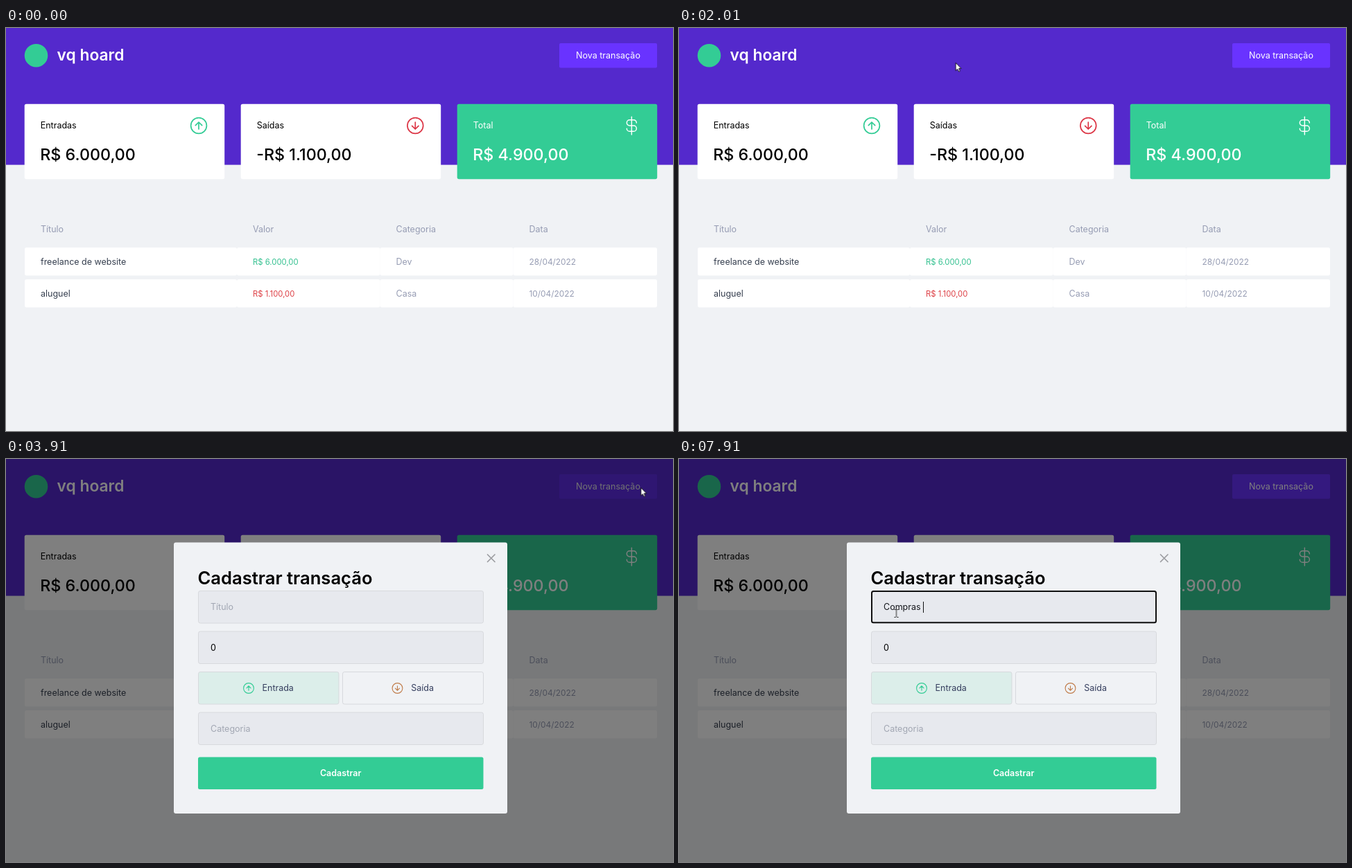
An HTML page that plays this animation: 962x582 px, repeating every 8 s.

```html
<!DOCTYPE html>
<html lang="pt-BR">
<head>
<meta charset="utf-8">
<title>Transações</title>
<style>
  html, body { margin: 0; width: 100%; height: 100%; overflow: hidden; background: #f0f2f5; }
  svg { display: block; width: 100vw; height: 100vh; }
  text { font: 400 12.5px Inter, "Open Sans", sans-serif; }
  .middle { text-anchor: middle; }
  .brand { font-size: 22.8px; font-weight: 600; fill: #fff; }
  .amount { font-size: 23.3px; font-weight: 500; }
  .heading { font-size: 25.6px; font-weight: 600; }
  .strong { font-weight: 600; fill: #fff; }
  .white { fill: #fff; }
  .muted { fill: #969cb3; }
  .hint { fill: #a2a7b3; }
  .name { fill: #363f4f; }
  .gain, .loss { font-size: 11.3px; }
  .gain { fill: #33c08f; }
  .loss { fill: #dd4046; }
  .date { font-size: 11.9px; fill: #969cb3; }
  .choice { fill: #363f5f; }
  .field { fill: #e7e9ee; stroke: #d7d9dd; }
  .field.plain { fill: #f0f2f5; }
  .field.chosen { fill: #dceeea; }
  .line { fill: none; stroke-width: 1.7; stroke-linecap: round; stroke-linejoin: round; }
  .green { stroke: #33cc95; }
  .red { stroke: #dc3545; }
  .amber { stroke: #c07c4a; }
  #modal, #focus, #caret, #beam, .key { visibility: hidden; }
</style>
</head>
<body>
<svg viewBox="0 0 962 582">
  <defs>
    <g id="arrow-icon">
      <circle r="11.4"/>
      <path d="M0 5V-5M-4.7 -.3L0 -5L4.7 -.3"/>
    </g>
  </defs>

  <rect width="962" height="582" fill="#f0f2f5"/>
  <rect width="962" height="197.6" fill="#5429cc"/>
  <circle cx="43.5" cy="39.7" r="16.8" fill="#33cc95"/>
  <text class="brand" x="73.5" y="47">vq hoard</text>

  <rect x="798" y="22" width="141" height="35.5" rx="2" fill="#6933ff"/>
  <text class="white middle" x="868.5" y="44">Nova transação</text>
  <rect id="hover" x="798" y="22" width="141" height="35.5" rx="2" opacity="0"/>

  <g id="cards"></g>
  <use href="#arrow-icon" class="line green" transform="translate(278 141)"/>
  <use href="#arrow-icon" class="line red" transform="translate(590.3 141) scale(1 -1)"/>
  <path class="line" stroke="#fff" style="stroke-width:1.25" transform="translate(888.3 127) scale(1.17)"
    d="M12 1V23M18 8.5A3.5 3.5 0 0 0 14.5 5H9.5a3.5 3.5 0 0 0 0 7h5a3.5 3.5 0 0 1 0 7H9.5A3.5 3.5 0 0 1 6 15.5"/>
  <g id="table"></g>

  <g id="modal">
    <rect width="962" height="582" opacity=".5"/>
    <rect x="242" y="120.5" width="481" height="391.5" rx="3" fill="#f0f2f5"/>
    <path class="line" stroke="#9c9da1" d="M694.5 138L705 148.5M705 138L694.5 148.5"/>
    <text class="heading" x="276.5" y="181">Cadastrar transação</text>
    <g id="fields"></g>
    <use href="#arrow-icon" class="line green" transform="translate(350 331) scale(.65)"/>
    <use href="#arrow-icon" class="line amber" transform="translate(564.5 331) scale(.65 -.65)"/>
    <text class="choice" x="369.5" y="335.3">Entrada</text>
    <text class="choice" x="584.3" y="335.3">Saída</text>
    <rect x="277" y="430.5" width="411.5" height="46.5" rx="2.5" fill="#33cc95"/>
    <text class="strong middle" x="482.7" y="458">Cadastrar</text>
    <text class="hint" id="placeholder" x="295" y="218.3">Título</text>
    <text id="typed" x="295" y="218.3" fill="#16181d"></text>
  </g>
  <rect id="focus" x="278" y="191" width="410" height="45.3" rx="2.5" fill="none" stroke="#101010" stroke-width="2"/>
  <rect id="caret" x="295" y="206" width="1" height="16" fill="#111"/>

  <g id="pointer">
    <path id="arrow" fill="#fff" stroke="#111" stroke-width=".9" d="M.4 .4V11.8L3 9.4L4.8 13.2L6.6 12.4L4.9 8.6H8.3Z"/>
    <path id="beam" fill="none" stroke="#222" d="M-3 -5.5H-.8M.8 -5.5H3M0 -5V5M-3 5.5H-.8M.8 5.5H3"/>
  </g>
</svg>
<script>
  const LOOP = 8000;
  const $ = id => document.getElementById(id);
  const rect = (x, y, w, h, attrs) => `<rect x="${x}" y="${y}" width="${w}" height="${h}" rx="2.7" ${attrs}/>`;
  const text = (x, y, type, value) => `<text x="${x}" y="${y}" class="${type}">${value}</text>`;

  const cards = [['Entradas', 'R$ 6.000,00'], ['Saídas', '-R$ 1.100,00'], ['Total', 'R$ 4.900,00']];
  $('cards').innerHTML = cards.map(([label, amount], i) => {
    const x = 26.7 + 312 * i;
    const type = i === 2 ? 'white' : '';
    return rect(x, 109.7, 288.5, 108.6, `fill="${i === 2 ? '#33cc95' : '#fff'}"`)
      + text(x + 23, 145.3, type, label) + text(x + 22.5, 191, `amount ${type}`, amount);
  }).join('');

  const columns = [27, 333, 539.5, 731.5, 939];
  const cells = (y, types, values) =>
    values.map((value, i) => text(columns[i] + 23, y, types[i], value)).join('');
  const row = (y, kind, values) =>
    values.map((_, i) => rect(columns[i], y, columns[i + 1] - columns[i], 40.5, 'fill="#fff"')).join('')
    + cells(y + 24.7, ['name', kind, 'muted', 'date'], values);
  $('table').innerHTML =
    cells(295, Array(4).fill('muted'), ['Título', 'Valor', 'Categoria', 'Data'])
    + row(317, 'gain', ['freelance de website', 'R$ 6.000,00', 'Dev', '28/04/2022'])
    + row(363, 'loss', ['aluguel', 'R$ 1.100,00', 'Casa', '10/04/2022']);

  const field = (line, label = '', type = '', x = 277.5, width = 411) => {
    const y = 190.5 + 58.5 * line;
    return rect(x, y, width, 46.5, `class="field ${type}"`) + text(295, y + 28, label === '0' ? '' : 'hint', label);
  };
  $('fields').innerHTML = field(0) + field(1, '0') + field(2, '', 'chosen', 277.5, 202.5)
    + field(2, '', 'plain', 485.5, 203) + field(3, 'Categoria');

  // Each step is [milliseconds, value].
  function track(el, prop, steps, easing = 'step-end') {
    const frames = steps.map(([ms, value]) => ({ offset: ms / LOOP, [prop]: value, easing }));
    frames.push({ offset: 1, [prop]: steps.at(-1)[1] });
    el.animate(frames, { duration: LOOP, iterations: Infinity });
  }

  // Starts hidden and flips at every given time.
  const toggle = (el, ...times) => track(el, 'visibility',
    [0, ...times].map((ms, i) => [ms, i % 2 ? 'visible' : 'hidden']));

  // Smooth curve through [ms, x, y] points that never overshoots them.
  function glide(points, samples = 10) {
    const slope = (i, k) => (points[i + 1][k] - points[i][k]) / (points[i + 1][0] - points[i][0]);
    const tangent = (i, k) => {
      if (i === 0 || i === points.length - 1) return 0;
      const a = slope(i - 1, k), b = slope(i, k);
      return a * b > 0 ? 2 * a * b / (a + b) : 0;
    };
    const at = (i, k, u) => {
      const span = points[i + 1][0] - points[i][0];
      const ease = u * u * (3 - 2 * u);
      return points[i][k] + (points[i + 1][k] - points[i][k]) * ease
        + span * u * (1 - u) * (tangent(i, k) * (1 - u) - tangent(i + 1, k) * u);
    };
    const steps = [];
    for (let i = 0; i < points.length - 1; i++) {
      for (let n = 0; n < samples; n++) {
        const u = n / samples;
        const ms = points[i][0] + u * (points[i + 1][0] - points[i][0]);
        steps.push([ms, `translate(${at(i, 1, u)}px, ${at(i, 2, u)}px)`]);
      }
    }
    const [ms, x, y] = points.at(-1);
    return [...steps, [ms, `translate(${x}px, ${y}px)`]];
  }

  const route = [
    [0, 920, 590], [200, 920, 590], [1060, 611, 270], [1420, 239.5, 261.5], [1640, 4, 185],
    [2080, 477, 43], [2620, 930, 215], [2720, 948, 243], [3400, 915.5, 41], [3910, 915.5, 41],
    [4420, 663, 271], [4610, 663, 271], [4740, 319, 227], [4960, 313.5, 223]
  ];
  track($('pointer'), 'transform', glide(route), 'linear');
  track($('arrow'), 'visibility', [[0, 'visible'], [4350, 'hidden']]);
  toggle($('beam'), 4350);

  track($('hover'), 'opacity', [[0, 0], [3200, 0], [3400, .1], [3930, .1], [4130, 0]], 'linear');
  toggle($('modal'), 3910);
  toggle($('focus'), 5060);
  toggle($('caret'), 5060, 5590, 6080);

  const word = 'Compras\u00a0';
  const keyTimes = [6210, 6410, 6560, 6780, 7270, 7400, 7620, 7910];
  const typed = $('typed');
  typed.innerHTML = [...word].map(letter => `<tspan class="key">${letter}</tspan>`).join('');
  [...typed.children].forEach((letter, i) => toggle(letter, keyTimes[i]));
  const caretAt = i => `translateX(${Math.round(typed.getSubStringLength(0, i + 1))}px)`;
  track($('caret'), 'transform', [[0, 'translateX(0px)'], ...keyTimes.map((ms, i) => [ms, caretAt(i)])]);
  track($('placeholder'), 'opacity', [[0, 1], [keyTimes[0], 0]]);
</script>
</body>
</html>
```
